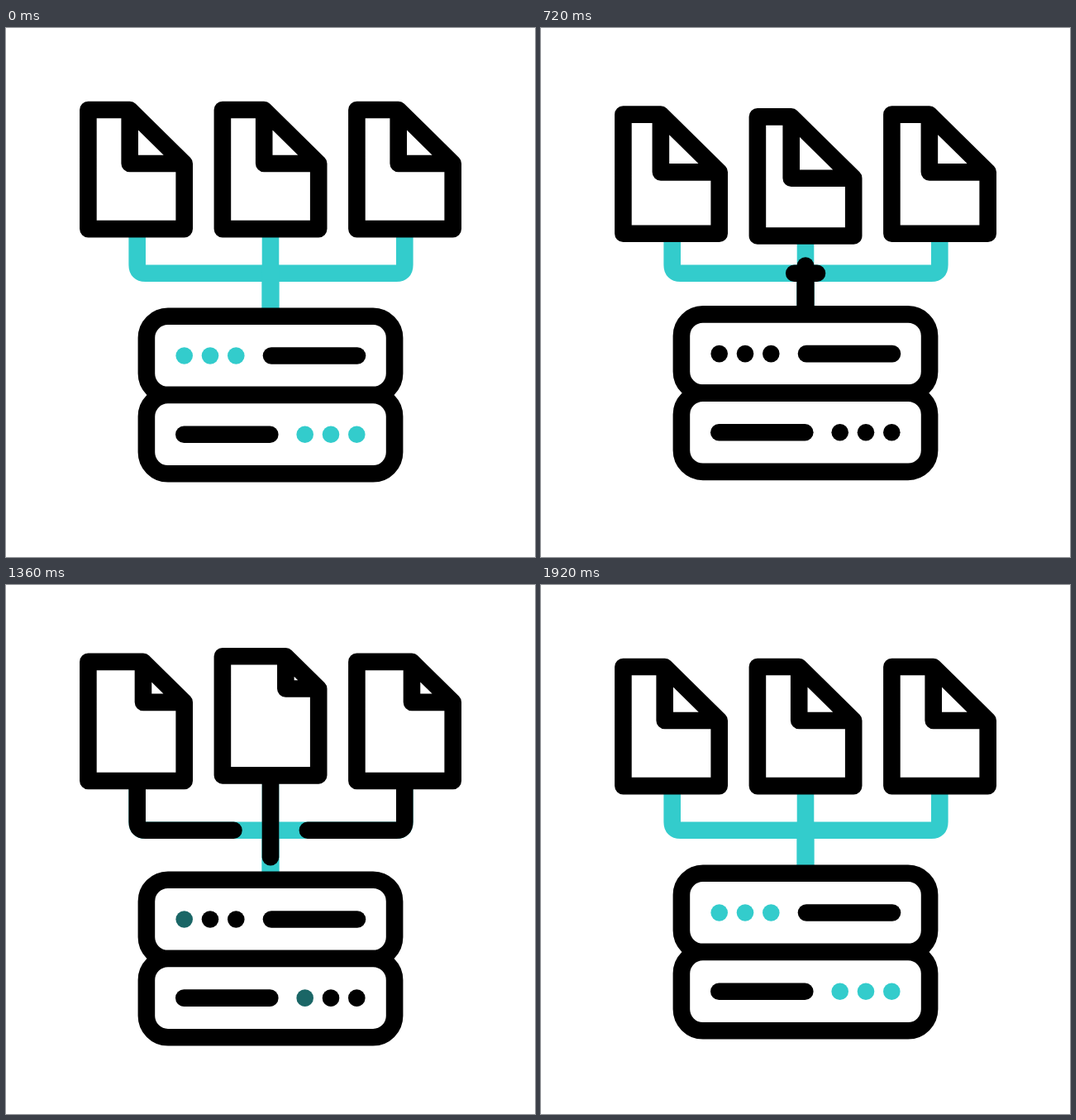
Animation, 640 px wide and 640 px high, one loop 2120 ms. Source, as an HTML page:

```html
<!DOCTYPE html>
<html lang="en">
<head>
<meta charset="utf-8">
<title>Files and server</title>
<style>
  html, body { margin: 0; width: 100%; height: 100%; overflow: hidden; background: #fff; }
  svg { display: block; width: 100vw; height: 100vh; }
  .line { stroke: #000; stroke-width: 20.6; stroke-linecap: round; stroke-linejoin: round; fill: none; }
  .solid { fill: #fff; }
  .wire { stroke: #3cc; stroke-linecap: butt; }
</style>
</head>
<body>
<svg id="stage" viewBox="0 0 640 640"></svg>
<script>
const LOOP = 2120, STEP = 20;
const stage = document.getElementById('stage');

function add(parent, tag, attrs) {
  const el = document.createElementNS('http://www.w3.org/2000/svg', tag);
  for (const key in attrs) el.setAttribute(key, attrs[key]);
  return parent.appendChild(el);
}

const clamp = v => Math.min(1, Math.max(0, v));
const ramp = (t, from, to) => clamp((t - from) / (to - from));

// Eased value on a track of times and matching values
function track(t, times, values) {
  let v = values[0];
  for (let i = 1; i < times.length; i++) {
    const p = ramp(t, times[i - 1], times[i]);
    v += (values[i] - values[i - 1]) * (1 - Math.cos(Math.PI * p)) / 2;
  }
  return v;
}

const OUTER = [220, 420, 1280, 1510, 1890];
const MIDDLE = [290, 495, 1345, 1590, 1920];
const FILE_Y = [0, 12.5, -13, 12.5, 0];
const FOLD = [66, 82.5, 39.5, 77.4, 66];
const SERVER_Y = [0, -8.5, 14, -8.5, 0];

// Cables: a pulse fills the wire, then drains towards the server
const elbow = (x, dir) =>
  `M${x} 225V286.7Q${x} 296.7 ${x + 10 * dir} 296.7H320V350`;
const SIDE = { fill: [220, 526], drain: [598, 758] };
const CENTRE = { fill: [220, 460], drain: [640, 800] };
const PULSE_GAP = 940;
const cables = [
  { d: elbow(158.7, 1), time: SIDE },
  { d: elbow(482.3, -1), time: SIDE },
  { d: 'M320 225V350', time: CENTRE }
];
for (const c of cables) add(stage, 'path', { d: c.d + 'v12', class: 'line wire' });
for (const c of cables) c.pulse = add(stage, 'path', { d: c.d, class: 'line', pathLength: 1 });

// Server
const server = add(stage, 'g', {});
const dots = [];
[[348.8, 215.7, 321], [444, 361.7, 215.3]].forEach(([y, dotX, barX]) => {
  add(server, 'rect', { x: 169.9, y, width: 300.2, height: 95.3, rx: 26, class: 'line solid' });
  const mid = y + 47.7;
  add(server, 'path', { d: `M${barX} ${mid}h104`, class: 'line' });
  for (let i = 0; i < 3; i++) {
    const el = add(server, 'circle', { cx: dotX + 31.3 * i, cy: mid, r: 10.3 });
    dots.push({ el, on: 390 + 90 * i, off: 1305 + 90 * i });
  }
});

// Files
const files = [0, 162.5, 325].map((x, i) => ({
  x, times: i === 1 ? MIDDLE : OUTER,
  el: add(stage, 'path', { class: 'line solid' })
}));

function draw(t) {
  for (const f of files) {
    const fold = track(t, f.times, FOLD);
    const left = 215.7 - fold, low = 99 + fold * 0.985;
    f.el.setAttribute('d',
      `M${left} 99H99.4V243.1H215.7V${low}ZV${low}H215.7`);
    f.el.setAttribute('transform', `translate(${f.x} ${track(t, f.times, FILE_Y)})`);
  }
  server.setAttribute('transform', `translate(0 ${track(t, OUTER, SERVER_Y)})`);

  const pulseTime = t < 220 + PULSE_GAP ? t : t - PULSE_GAP;
  for (const { pulse, time } of cables) {
    const head = ramp(pulseTime, ...time.fill), tail = ramp(pulseTime, ...time.drain);
    pulse.style.display = head > tail ? '' : 'none';
    pulse.setAttribute('stroke-dasharray', `${head - tail} 3`);
    pulse.setAttribute('stroke-dashoffset', -tail);
  }

  for (const { el, on, off } of dots) {
    const light = 1 - ramp(t, on, on + 110) + ramp(t, off, off + 110);
    el.setAttribute('fill', `rgb(${51 * light},${204 * light},${204 * light})`);
  }
}

const start = performance.now();
function tick() {
  const t = (performance.now() - start) % LOOP;
  draw(Math.floor(t / STEP) * STEP);
  requestAnimationFrame(tick);
}
tick();
</script>
</body>
</html>
```
